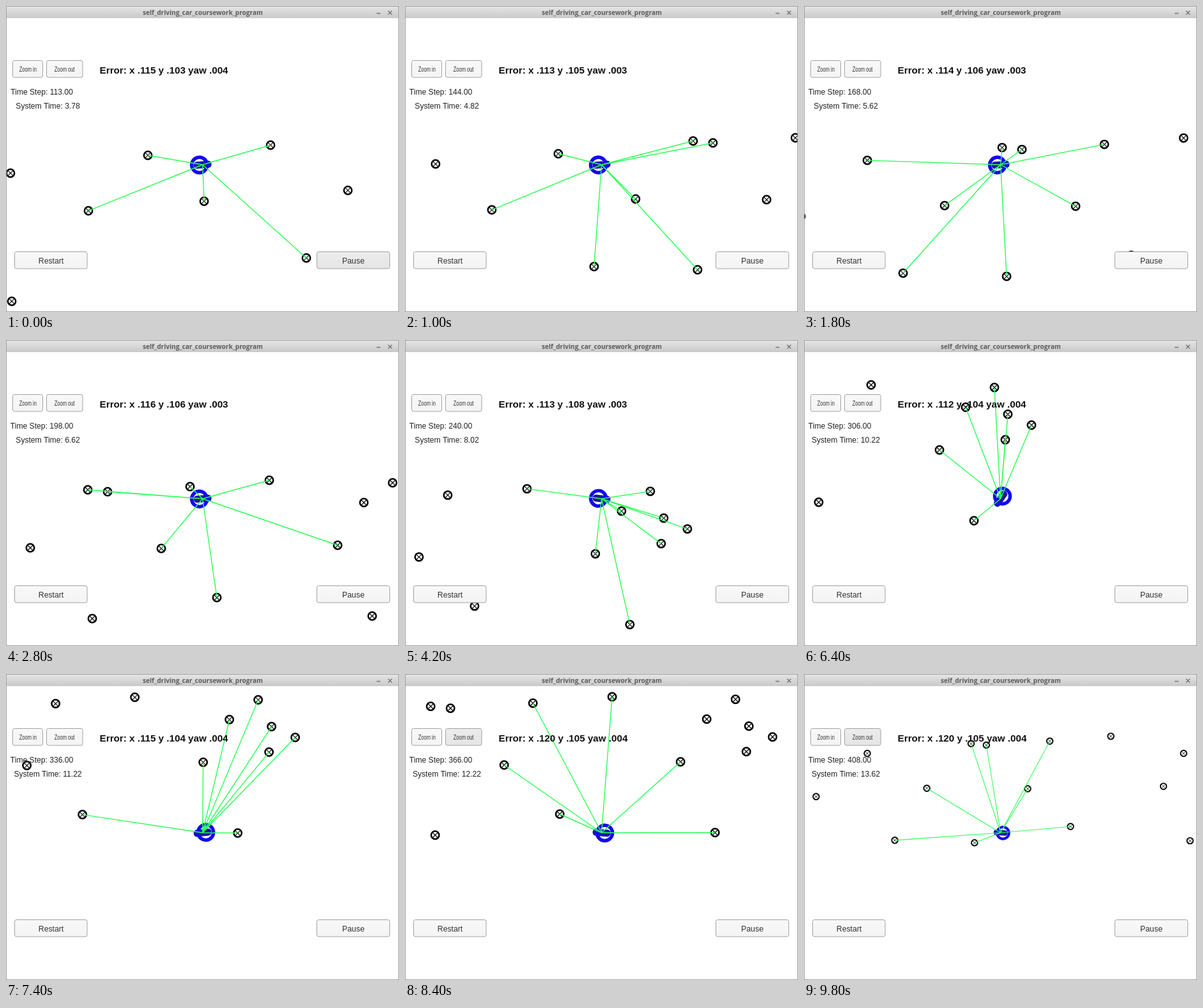
An HTML page with a canvas that plays this animation: 615 px wide and 480 px high, repeating every 10 s.

```html
<!DOCTYPE html>
<html lang="en">
<head>
<meta charset="utf-8">
<title>Localization simulator</title>
<style>
  html, body { margin: 0; width: 100%; height: 100%; overflow: hidden; background: #fff; }
  canvas { display: block; width: 615px; height: 480px; }
</style>
</head>
<body>
<canvas id="stage" width="615" height="480"></canvas>
<script>
const ctx = document.getElementById('stage').getContext('2d');
const LOOP = 10000, TICK = 200;
const HUB = { x: 307.6, y: 249 };
const SENSOR_RANGE = 230.2;
const SANS = '"Liberation Sans", Arial, sans-serif';

// The map: fixed points the car passes
const landmarks = [
  [-490, 299], [-488, 500], [-368, 358], [-275, 271], [-187, 343], [-83, 255],
  [-27, 432], [38, 326], [128, 235], [159, 238], [135, 437], [243, 327],
  [288, 230], [330, 404], [412, 220], [519, 322], [560, 255], [573, 433],
  [605, 224], [626, 266], [663, 283], [622, 306]
];

// Key points at even spacing: out along a line, a U-turn, and back
const routeX = [-807, -621, -425, -218, 0, 197, 303, 307, 187, 33, -151, -340];
const routeY = [62, 47, 31, 15.5, 0, -15.5, 22, 149.5, 186, 180, 165, 150];
const errorX = [115, 113, 116, 113, 111, 113, 120, 120];
const errorY = [103, 106, 106, 108, 105, 104, 105, 105];

// Catmull-Rom through evenly spaced values
function spline(values, u) {
  const i = Math.floor(u), t = u - i;
  const [a, b, c, d] = [-1, 0, 1, 2].map(k =>
    values[Math.min(Math.max(i + k, 0), values.length - 1)]);
  return b + t / 2 * (c - a + t * (2 * a - 5 * b + 4 * c - d + t * (3 * (b - c) + d - a)));
}

function pose(step) {
  const at = s => [routeX, routeY].map(values => spline(values, (s - 54) / 36));
  const [x, y] = at(step), [nextX, nextY] = at(step + .1);
  return { x, y, heading: Math.atan2(nextY - y, nextX - x) };
}

function errorText(step) {
  const u = (step - 114) / 42;
  const yaw = step > 140 && step < 280 ? 3 : 4;
  return `Error: x .${Math.round(spline(errorX, u))} y .${Math.round(spline(errorY, u))} yaw .00${yaw}`;
}

function text(str, x, y, font, color = '#222', align = 'center', squeeze = 1) {
  ctx.save();
  ctx.translate(x, y);
  ctx.scale(squeeze, 1);
  ctx.font = font;
  ctx.fillStyle = color;
  ctx.textAlign = align;
  ctx.fillText(str, 0, 0);
  ctx.restore();
}

function vertical(y, h, top, bottom) {
  const g = ctx.createLinearGradient(0, y, 0, y + h);
  g.addColorStop(0, top);
  g.addColorStop(1, bottom);
  return g;
}

function button(x, y, w, h, hover) {
  ctx.beginPath();
  ctx.roundRect(x, y, w, h, 3);
  ctx.fillStyle = hover ? vertical(y, h, '#ececec', '#e5e5e5') : vertical(y, h, '#f8f8f8', '#f4f4f4');
  ctx.fill();
  ctx.strokeStyle = '#a2a2a2';
  ctx.lineWidth = 1;
  ctx.stroke();
}

function lines(color, width, ...pairs) {
  ctx.strokeStyle = color;
  ctx.lineWidth = width;
  ctx.beginPath();
  for (const [x1, y1, x2, y2] of pairs) {
    ctx.moveTo(x1, y1);
    ctx.lineTo(x2, y2);
  }
  ctx.stroke();
}

function ring(x, y, r, width, color) {
  ctx.beginPath();
  ctx.arc(x, y, r, 0, 2 * Math.PI);
  ctx.strokeStyle = color;
  ctx.lineWidth = width;
  ctx.stroke();
}

function marker([x, y]) {
  ring(x, y, 6.2, 2.5, '#000');
  lines('#000', 1.1, [x - 4, y - 4, x + 4, y + 4], [x - 4, y + 4, x + 4, y - 4]);
}

function car(heading) {
  ctx.save();
  ctx.rotate(heading);
  ctx.fillStyle = '#1414c4';
  ctx.beginPath();
  ctx.roundRect(-14, -5.5, 28, 11, 5);
  ctx.fill();
  ctx.fillStyle = '#23264f';
  ctx.fillRect(-9, -3.5, 4, 7);
  ctx.fillRect(2, -4, 4, 8);
  ring(-5, 0, 12.1, 5.4, '#1208ee');
  ctx.restore();
}

function world(step, zoom) {
  const p = pose(step);
  const seen = landmarks.map(([x, y]) => [x - p.x - HUB.x, y - p.y - HUB.y]);
  ctx.save();
  ctx.translate(HUB.x, HUB.y);
  ctx.scale(zoom, zoom);
  seen.forEach(marker);
  car(p.heading);
  const near = seen.filter(([x, y]) => Math.hypot(x, y) < SENSOR_RANGE);
  lines('#2cff58', 1.4, ...near.map(([x, y]) => [0, 0, x, y]));
  ctx.restore();
}

function windowFrame() {
  ctx.fillStyle = vertical(0, 19, '#e6e6e6', '#c9c9c9');
  ctx.fillRect(0, 0, 615, 19);
  text('self_driving_car_coursework_program', 308, 14, 'bold 10.1px "Open Sans", sans-serif', '#5c5c5c');
  lines('#777', 1.4, [580, 11.5, 586, 11.5], [598, 7.5, 604, 13.5], [598, 13.5, 604, 7.5]);
  ctx.strokeStyle = '#a0a0a0';
  ctx.lineWidth = 1;
  ctx.strokeRect(.5, .5, 614, 479);
}

function controls(frame, step) {
  button(10.5, 85.5, 47, 26.5, false);
  button(63.5, 85.5, 56.5, 26.5, frame >= 40);
  text('Zoom in', 34.3, 103, '10px ' + SANS, '#333', 'center', .75);
  text('Zoom out', 91.6, 103, '10px ' + SANS, '#333', 'center', .75);
  button(13.5, 385.5, 113.5, 26.5, false);
  button(486.5, 385.5, 114, 26.5, frame < 5);
  text('Restart', 70.5, 403.5, '12.2px ' + SANS, '#333');
  text('Pause', 543.5, 403.5, '12.4px ' + SANS, '#333');

  const clock = frame === 0 ? 3.78 : 3.82 + frame * .2;
  text(errorText(step), 146.6, 106, 'bold 15.2px ' + SANS, '#111', 'left');
  text(`Time Step: ${step.toFixed(2)}`, 56, 138.5, '12.1px ' + SANS);
  text(`System Time: ${clock.toFixed(2)}`, 65.5, 161, '12.1px ' + SANS);
}

function draw(ms) {
  const frame = Math.floor(ms % LOOP / TICK);
  const step = frame === 0 ? 113 : 114 + frame * 6;
  ctx.fillStyle = '#fff';
  ctx.fillRect(0, 0, 615, 480);
  world(step, frame >= 45 ? .77 : 1);
  controls(frame, step);
  windowFrame();
}

const start = performance.now();
function tick() {
  draw(performance.now() - start);
  requestAnimationFrame(tick);
}
tick();
</script>
</body>
</html>
```
